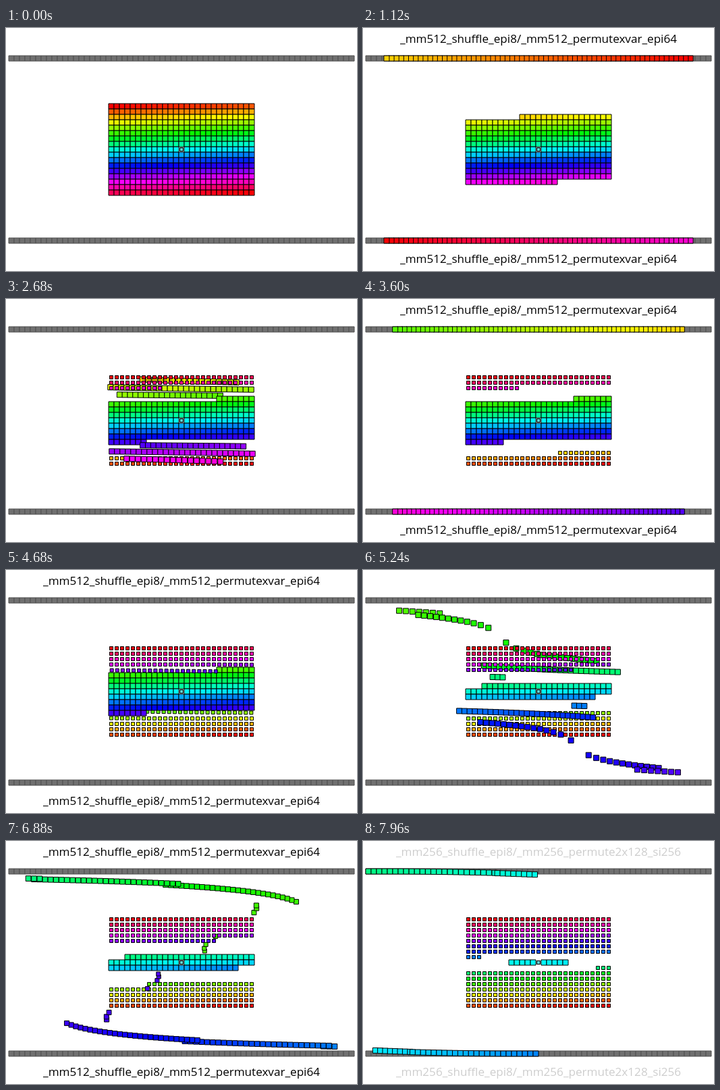
Animation, 520 px wide and 360 px high, one loop 8 s. Source, as an HTML page with a canvas:

```html
<!DOCTYPE html>
<html lang="en">
<head>
<meta charset="utf-8">
<title>SIMD array reversal</title>
<style>
  html, body { margin: 0; width: 100%; height: 100%; overflow: hidden; background: #fff; }
  canvas { display: block; width: 520px; height: 360px; }
</style>
</head>
<body>
<canvas id="stage"></canvas>
<script>
const W = 520, H = 360, LOOP = 8000, STEP = 40, CYCLE = 2500;
const COLS = 27, COUNT = 459, MID = 229, PITCH = 8;
const TOP_Y = 45, BOTTOM_Y = 315, SLOTS = 64;
const LOAD = -10, SHUFFLE = 818, STORE = 1655;
const FAST = 440, SLOW = 640;
const FADE_IN = 350, FADE_OUT = 2175, FADE = 300;

const chunks = [0, 64, 128, 192].map(base => ({
  base,
  size: base < 192 ? 64 : 32,
  label: base < 192
    ? '_mm512_shuffle_epi8/_mm512_permutexvar_epi64'
    : '_mm256_shuffle_epi8/_mm256_permute2x128_si256'
}));

const canvas = document.getElementById('stage');
const ctx = canvas.getContext('2d');
const ratio = window.devicePixelRatio || 1;
canvas.width = W * ratio;
canvas.height = H * ratio;
ctx.scale(ratio, ratio);

const clamp = v => Math.min(1, Math.max(0, v));
const mix = (a, b, p) => a + (b - a) * p;

// Closed form of cubic-bezier(1, 0, 0, 1).
function snap(v) {
  const r = Math.cbrt((clamp(v) - 0.5) / 4);
  return 0.5 + 1.5 * r - 2 * r ** 3;
}

function inOutCubic(v) {
  const u = clamp(v);
  return u < 0.5 ? 4 * u ** 3 : 1 - 4 * (1 - u) ** 3;
}

const home = i => ({
  x: 156 + PITCH * (i % COLS),
  y: 116 + PITCH * Math.floor(i / COLS)
});
const slotX = n => PITCH * (n + 1);

function drawCell(x, y, size, fill, stroke) {
  ctx.fillStyle = fill;
  ctx.strokeStyle = stroke;
  ctx.fillRect(x - size / 2, y - size / 2, size, size);
  ctx.strokeRect(x - size / 2, y - size / 2, size, size);
}

// Position and size of element i at time t.
function pose(i, t) {
  const start = home(i);
  const rank = Math.min(i, COUNT - 1 - i);
  const c = chunks.findIndex(k => rank >= k.base && rank < k.base + k.size);
  if (i === MID) return { ...start, size: 5 };
  if (c < 0) return { ...start, size: PITCH };

  const { base, size } = chunks[c];
  const k = rank - base;
  const local = t - c * CYCLE;
  const span = mix(FAST, SLOW, k / (size - 1));
  const load = snap((local - LOAD) / span);
  const shuffle = snap((local - SHUFFLE) / FAST);
  const store = snap((local - STORE) / span);

  const upper = i < MID;
  const from = slotX(upper ? k : size - 1 - k);
  const to = slotX(upper ? size - 1 - k : k);
  const end = home(COUNT - 1 - i);
  const x = mix(start.x, mix(from, to, shuffle), load);
  const y = mix(start.y, upper ? TOP_Y : BOTTOM_Y, load);
  return {
    x: mix(x, end.x, store),
    y: mix(y, end.y, store),
    size: mix(PITCH, 5, store)
  };
}

function drawLabel(t) {
  const c = Math.floor((t - LOAD) / CYCLE);
  const local = t - c * CYCLE;
  const alpha = inOutCubic((local - FADE_IN) / FADE) - inOutCubic((local - FADE_OUT) / FADE);
  if (alpha < 0.004) return;
  ctx.fillStyle = `rgba(0, 0, 0, ${alpha})`;
  ctx.fillText(chunks[c].label, W / 2, 22);
  ctx.fillText(chunks[c].label, W / 2, 348);
}

function draw(t) {
  ctx.fillStyle = '#fff';
  ctx.fillRect(0, 0, W, H);
  ctx.lineWidth = 1;
  ctx.lineJoin = 'round';
  ctx.textAlign = 'center';
  ctx.font = '500 17.1px "Open Sans", "Noto Sans", sans-serif';

  drawLabel(t);
  for (let n = 0; n < SLOTS; n++) {
    drawCell(slotX(n), TOP_Y, PITCH, '#707070', '#505050');
    drawCell(slotX(n), BOTTOM_Y, PITCH, '#707070', '#505050');
  }
  for (let i = 0; i < COUNT; i++) {
    const { x, y, size } = pose(i, t);
    const fill = i === MID ? '#6cc' : `hsl(${360 * i / COUNT}, 100%, 50%)`;
    drawCell(x, y, size, fill, '#000');
  }
}

const origin = performance.now();
function tick() {
  const elapsed = Math.max(0, performance.now() - origin);
  draw(Math.floor((elapsed + 4) / STEP) * STEP % LOOP);
  requestAnimationFrame(tick);
}
tick();
</script>
</body>
</html>
```
